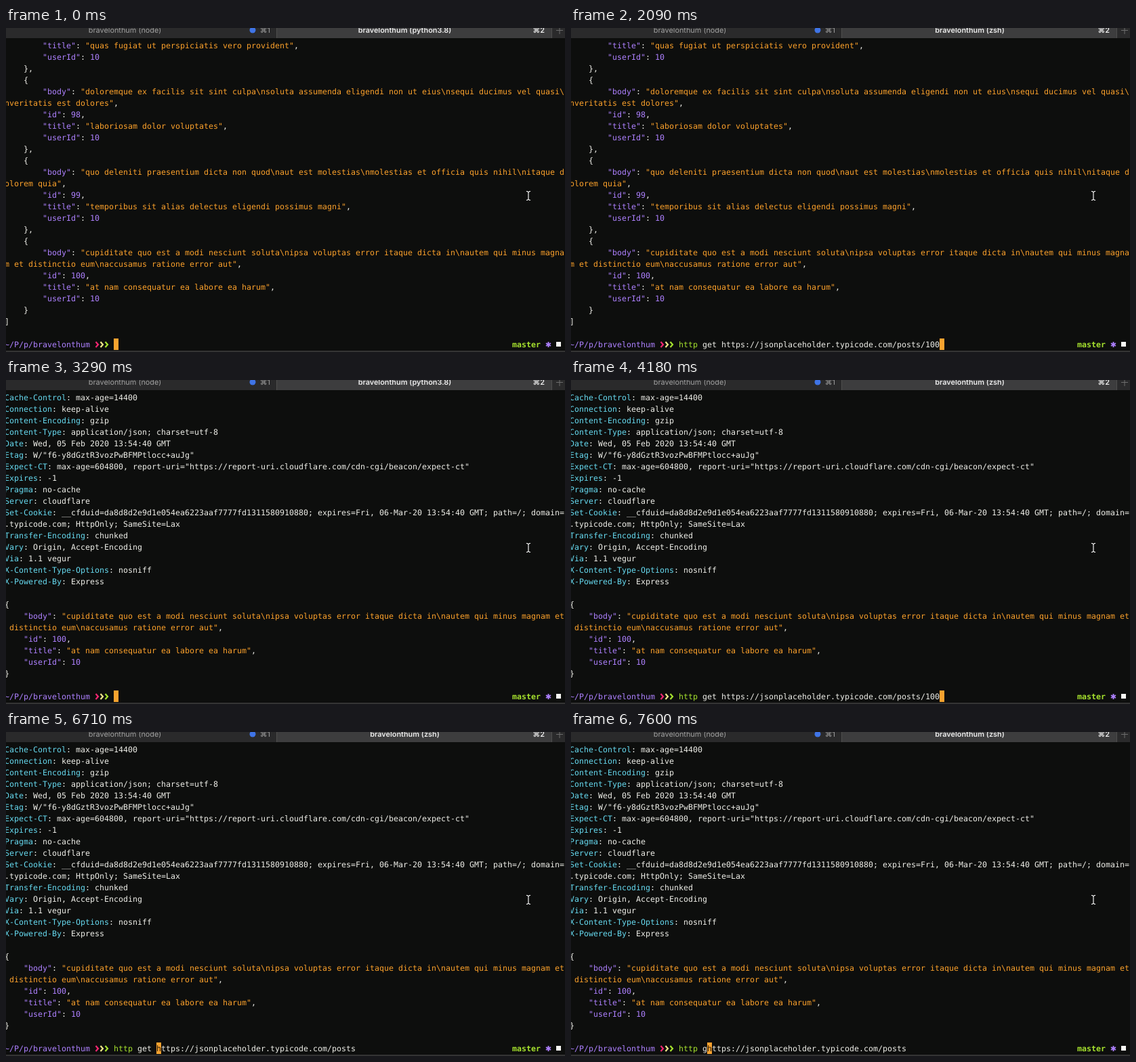
Write an HTML page that moves like this. It is 825 by 479 pixels and loops after 8000 ms.

```html
<!DOCTYPE html>
<html lang="en">
<head>
<meta charset="utf-8">
<title>Terminal session</title>
<style>
  html, body { margin: 0; width: 100%; height: 100%; overflow: hidden; background: #0d0e0d; }
  svg { display: block; }
  text { white-space: pre; text-rendering: geometricPrecision; }
  .mono { font: 11.627px "DejaVu Sans Mono", monospace; }
  .tab { font: 10.9px Inter, "DejaVu Sans", sans-serif; }
  .active { font-weight: 600; fill: #ececec; }
</style>
</head>
<body>
<svg id="stage" width="825" height="479" viewBox="0 0 825 479">
  <defs><clipPath id="screen"><rect y="17" width="825" height="460"/></clipPath></defs>
  <rect width="825" height="479" fill="#0d0e0d"/>
  <g clip-path="url(#screen)" class="mono">
    <g id="scroll">
      <g id="list"></g>
      <g id="reply"></g>
      <g id="prompt"></g>
      <g id="command"></g>
    </g>
    <rect id="cursor" width="7" height="17" y="459" fill="#f9a22f"/>
    <text id="under" y="472" fill="#1a1408"></text>
  </g>
  <rect y="477" width="825" height="2" fill="#343434"/>

  <g class="tab">
    <rect width="825" height="15" fill="#2a2a2b"/>
    <rect x="400" width="405" height="15" fill="#3d3d3e"/>
    <path d="M399.5 0V15M805.5 0V15" stroke="#4d4d4d"/>
    <text x="175.5" y="7" text-anchor="middle" fill="#a0a0a0">bravelonthum (node)</text>
    <circle cx="364" cy="3" r="4.5" fill="#3f74e6"/>
    <text x="390" y="7" text-anchor="end" fill="#a0a0a0">⌘1</text>
    <text id="title" class="active" x="588.5" y="7" text-anchor="middle"></text>
    <text class="active" x="795" y="7" text-anchor="end">⌘2</text>
    <path d="M812 3.5H822M817 -2V9" stroke="#6d6d6d" fill="none"/>
  </g>

  <path d="M768.5 241.5H769.5L771 243L772.5 241.5H773.5M771 243V253M768.5 254.5H769.5L771 253L772.5 254.5H773.5"
    fill="none" stroke="#f4f4f4" stroke-width="1.2" stroke-linecap="square"/>
</svg>
<script>
const LOOP = 8000, COLS = 118, CELL = 7, ROW = 17, LEFT = -2, CMD_COL = 23, LAST_ROW = 26;
const C = { text: '#eeeee8', key: '#ae81ff', str: '#fba12b', head: '#66d9ef',
            green: '#a6e22e', pink: '#f92672', yellow: '#f3e98a' };
const $ = id => document.getElementById(id);
const colX = col => LEFT + col * CELL;

function add(parent, tag, attrs, content = '') {
  const el = document.createElementNS('http://www.w3.org/2000/svg', tag);
  for (const k in attrs) el.setAttribute(k, attrs[k]);
  el.textContent = content;
  parent.append(el);
}

// Write text on the character grid; short runs keep every glyph in its cell.
function put(parent, s, col, row, fill, more = {}) {
  for (const run of s.matchAll(/\S{1,8}/g)) {
    add(parent, 'text', { x: colX(col + run.index), y: 30 + row * ROW, fill, ...more }, run[0]);
  }
}

// Split one logical line into [text, colour] pieces.
function colour(line) {
  const header = line.match(/^([A-Z][\w-]*)(:.*)$/);
  if (header) return [[header[1], C.head], [header[2], C.text]];
  return (line.match(/"[^"]*"|\d+|[^"\d]+/g) || []).map((s, i, all) => {
    if (s[0] === '"') return [s, (all[i + 1] || '').startsWith(':') ? C.key : C.str];
    return [s, /\d/.test(s) ? C.key : C.text];
  });
}

// Lay out lines, wrapping at the last column.
function print(parent, lines) {
  let row = 0;
  for (const line of lines) {
    let col = 0;
    for (let [s, fill] of colour(line)) {
      while (s) {
        if (col === COLS) { col = 0; row++; }
        const part = s.slice(0, COLS - col);
        put(parent, part, col, row, fill);
        col += part.length;
        s = s.slice(part.length);
      }
    }
    row++;
  }
}

const post = (pad, body, id, title) => [
  `"body": "${body}",`, `"id": ${id},`, `"title": "${title}",`, '"userId": 10'
].map(s => pad + s);

const raw = String.raw;
const pad = ' '.repeat(8), open = '    {', close = '    },';
const last = [raw`cupiditate quo est a modi nesciunt soluta\nipsa voluptas error itaque dicta in\nautem qui minus magnam et distinctio eum\naccusamus ratione error aut`,
  100, 'at nam consequatur ea labore ea harum'];

print($('list'), [
  pad + '"title": "quas fugiat ut perspiciatis vero provident",',
  pad + '"userId": 10',
  close, open,
  ...post(pad, raw`doloremque ex facilis sit sint culpa\nsoluta assumenda eligendi non ut eius\nsequi ducimus vel quasi\nveritatis est dolores`,
    98, 'laboriosam dolor voluptates'),
  close, open,
  ...post(pad, raw`quo deleniti praesentium dicta non quod\naut est molestias\nmolestias et officia quis nihil\nitaque dolorem quia`,
    99, 'temporibus sit alias delectus eligendi possimus magni'),
  close, open,
  ...post(pad, ...last),
  '    }', ']'
]);

print($('reply'), [
  'Cache-Control: max-age=14400',
  'Connection: keep-alive',
  'Content-Encoding: gzip',
  'Content-Type: application/json; charset=utf-8',
  'Date: Wed, 05 Feb 2020 13:54:40 GMT',
  'Etag: W/"f6-y8dGztR3vozPwBFMPtlocc+auJg"',
  'Expect-CT: max-age=604800, report-uri="https://report-uri.cloudflare.com/cdn-cgi/beacon/expect-ct"',
  'Expires: -1',
  'Pragma: no-cache',
  'Server: cloudflare',
  'Set-Cookie: __cfduid=da8d8d2e9d1e054ea6223aaf7777fd1311580910880; expires=Fri, 06-Mar-20 13:54:40 GMT; path=/; domain=.typicode.com; HttpOnly; SameSite=Lax',
  'Transfer-Encoding: chunked',
  'Vary: Origin, Accept-Encoding',
  'Via: 1.1 vegur',
  'X-Content-Type-Options: nosniff',
  'X-Powered-By: Express',
  '', '{',
  ...post('    ', ...last),
  '}'
]);

const prompt = $('prompt');
put(prompt, '~/P/p/bravelonthum', 0, LAST_ROW, C.key);
[C.pink, C.yellow, C.green].forEach((stroke, i) =>
  add(prompt, 'path', { d: `M${132.5 + i * CELL} 464l3.5 4l-3.5 4`, stroke, 'stroke-width': 2.2, fill: 'none' }));
put(prompt, 'master', 107, LAST_ROW, C.green, { 'font-weight': 700 });
add(prompt, 'path', { d: 'M800.5 464V472M797 466L804 470M797 470L804 466', stroke: C.key, 'stroke-width': 1.9 });
add(prompt, 'rect', { x: 812, y: 464, width: 7, height: 7, fill: '#f8f8f4' });

const url = 'https://jsonplaceholder.typicode.com/posts', get = 'http get ' + url;

// [time, command, cursor column]; the cursor sits at the end by default.
const edits = [
  [0, ''], [600, get], [1200, get + '/'], [1950, get + '/10'], [2090, get + '/100'],
  [3290, ''], [4180, get + '/100'], [5680, get + '/10'], [5820, get + '/1'],
  [5970, get + '/'], [6120, get], [6420, get, 46], [6560, get, 17], [6710, get, 9],
  [7300, 'http get' + url, 8], [7450, 'http ge' + url, 7], [7600, 'http g' + url, 6]
];

function draw(t) {
  const [, cmd, col = cmd.length] = edits.filter(e => e[0] <= t).pop();
  const replied = t >= 3290, waiting = t >= 2690 && !replied;
  const running = t < 300 || (replied && t < 3890);
  const x = waiting ? LEFT : colX(CMD_COL + col);

  $('title').textContent = `bravelonthum (${running ? 'python3.8' : 'zsh'})`;
  $('list').style.display = replied ? 'none' : '';
  $('reply').style.display = replied ? '' : 'none';
  $('scroll').setAttribute('transform', `translate(0 ${waiting ? -ROW : 0})`);
  $('command').replaceChildren();
  put($('command'), cmd.slice(0, 4), CMD_COL, LAST_ROW, C.green);
  put($('command'), cmd.slice(5), CMD_COL + 5, LAST_ROW, C.text);
  $('cursor').setAttribute('x', x);
  $('under').setAttribute('x', x);
  $('under').textContent = waiting ? '' : cmd.charAt(col);
}

const start = performance.now();
function tick() {
  draw((performance.now() - start) % LOOP);
  requestAnimationFrame(tick);
}
tick();
</script>
</body>
</html>
```
